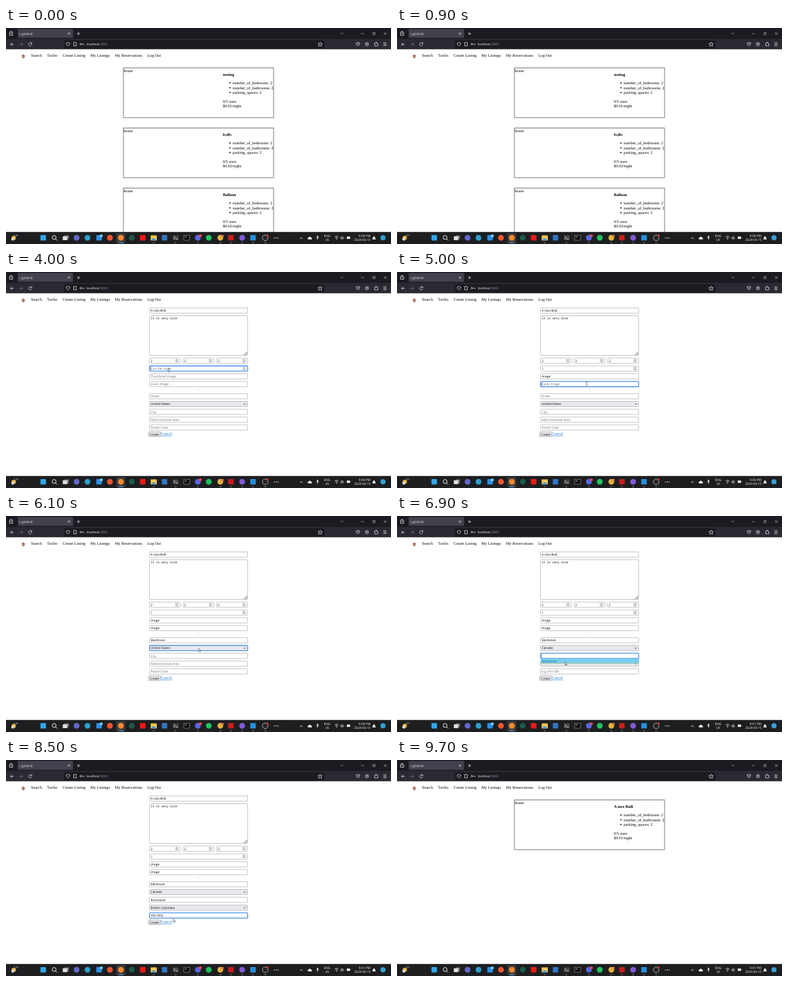
Recreate the animation shown at these times as an HTML page. Size 600 by 338 pixels, loop 9900 ms.

```html
<!DOCTYPE html>
<html lang="en">
<head>
<meta charset="utf-8">
<title>Listing form</title>
<style>
html, body { margin: 0; width: 100%; height: 100%; overflow: hidden; background: #fff; }
svg { display: block; text-rendering: geometricPrecision; }
text { white-space: pre; }
.serif { font: 6.25px "Liberation Serif", serif; }
.bold { font: bold 6.25px "Liberation Serif", serif; }
.ui { font: 500 4.85px "Open Sans", sans-serif; }
.mono { font: 4.6px "DejaVu Sans Mono", monospace; }
</style>
</head>
<body>
<svg width="600" height="338" viewBox="0 0 600 338">
  <rect width="600" height="338" fill="#fff"/>
  <g id="chrome"></g>
  <g id="page"></g>
  <g id="bar"></g>
  <g id="pointer"></g>
</svg>
<script>
const LOOP = 9900, STEP = 100;
const $ = id => document.getElementById(id);
const rect = (x, y, w, h, fill, extra = '') =>
  `<rect x="${x}" y="${y}" width="${w}" height="${h}" fill="${fill}" ${extra}/>`;
const dot = (x, y, r, fill, extra = '') => `<circle cx="${x}" cy="${y}" r="${r}" fill="${fill}" ${extra}/>`;
const line = (d, stroke = '#ddd', w = .8, fill = 'none') =>
  `<path d="${d}" fill="${fill}" stroke="${stroke}" stroke-width="${w}"/>`;
const text = (s, x, y, cls = 'serif', fill = '#000', extra = '') =>
  `<text x="${x}" y="${y}" class="${cls}" fill="${fill}" ${extra}>${s}</text>`;

function drawChrome() {
  return rect(0, 0, 600, 17, '#1c1b22') + rect(0, 17, 600, 16.3, '#2b2a33') +
    rect(18.2, 1.5, 86.3, 14, '#42414d', 'rx="1.5"') +
    text('LightBnB', 21, 10.6, 'ui', '#e4e4e8') +
    line('M96.500 7l3.500 3.500m0-3.500l-3.500 3.500M110.500 8.800h5m-2.500-2.500v5') +
    line('M5.500 7h5v4.500h-5zM6.300 5.500h3.400M6.800 9h2.400') +
    line('M521 7.500l2.200 2.200 2.200-2.200', '#aaa') +
    line('M553.500 8.800h4M571.800 7h3.400v3.400h-3.400zM589 6.800l4 4m0-4l-4 4', '#ddd', .6) +
    line('M12 25.500h-5m2.300-2.300l-2.300 2.300 2.300 2.300') +
    line('M21 25.500h5m-2.300-2.300l2.300 2.300-2.300 2.300', '#77767e') +
    line('M39.600 24a2.500 2.500 0 1 0 .4 2.200M40.200 22.300v2.200h-2.200') +
    rect(90.5, 19, 406, 13, '#1c1b22', 'rx="1.5"') +
    line('M96.500 22.500l2.500 .8v2.500l-2.500 2.200-2.500-2.200v-2.500zM105.500 22.700h4v5.300h-4z') +
    dot(116.5, 25.3, 1.2, 'none', 'stroke="#ddd" stroke-width=".8"') + line('M117.700 25.300h4v1.300') +
    text('localhost<tspan fill="#9a99a3">:3000</tspan>', 125.5, 27.3, 'ui', '#fff') +
    line('M489.500 22l1 2.300 2.500 .2-1.900 1.700 .6 2.500-2.200-1.400-2.200 1.400 .6-2.500-1.900-1.700 2.500-.2z') +
    line('M546 23h5v2.500q-2.500 4.500-5 0zM547.300 24.600l1.200 1.200 1.200-1.200') +
    dot(562.5, 25.3, 2.6, 'none', 'stroke="#ddd" stroke-width=".8"') + dot(562.5, 25, 1.1, '#ddd') +
    line('M574.500 24h1.500v-1.500h1.800v1.500h1.700v4h-5zM588 23.200h5m-5 2.200h5m-5 2.200h5') +
    // navigation
    rect(25, 43.8, 4, 3.4, '#d2a184') + line('M24.200 44l2.800-2.600 2.800 2.600z', '#96594a', .5, '#b0695a') +
    rect(26.4, 45.2, 1.2, 2, '#7a4b3a') +
    [['Search', 39], ['Tavlin', 64], ['Create Listing', 88.3], ['My Listings', 131.5],
     ['My Reservations', 169.8], ['Log Out', 220.2]].map(([s, x]) => text(s, x, 45.4)).join('');
}

// plain marks of the task bar: x, colour, round
const MARKS = [[58, '#35a5e5'], [110, '#6168c8', 1], [127, '#2b9fd0', 1], [145, '#2f8fe0'],
  [162, '#f2542d', 1], [179, '#f58a2c', 1], [196, '#1d5a4a', 1], [213, '#f01818'], [247, '#3575c0'],
  [299, '#5966e8', 1], [316, '#1fc35c', 1], [334, '#e2b23a', 1], [350.5, '#c81e1e'],
  [368, '#7f5cd6', 1], [385, '#2590dc']];

function drawBar(clock) {
  const small = (s, x, y, anchor = 'end') => text(s, x, y, 'ui', '#fff', `text-anchor="${anchor}"`);
  return rect(0, 319.2, 600, 18.8, '#1d1e20') +
    rect(172, 321, 14, 15.5, '#3a3b3d', 'rx="1.5"') +
    dot(12, 328.5, 3.3, '#f3b93c') + dot(10.5, 330.5, 2.2, '#d8dce2') + small('17°', 19.5, 327, 'end') +
    MARKS.map(([x, c, round]) => round ? dot(x, 328.3, 4.5, c) : rect(x - 4.3, 324, 8.6, 8.6, c, 'rx="1"')).join('') +
    dot(75, 327.8, 3.1, 'none', 'stroke="#eee"') + line('M77.300 330l2.500 2.600', '#eee', 1) +
    rect(91, 324.5, 7, 6, '#777') + rect(88.5, 326, 7, 6, '#ddd') +
    rect(225.5, 324.5, 9.5, 8, '#f4c84c', 'rx=".7"') + rect(227.5, 329.5, 5.5, 3, '#3e92d3') +
    rect(260, 324.5, 9, 7.5, '#474747', 'rx="1"') + line('M261.500 326.500l2 1.700-2 1.700m3 .3h3', '#fff') +
    rect(277, 324.5, 9, 7.5, '#090909', 'stroke="#aaa" stroke-width=".6"') + line('M278.500 327h3', '#fff') +
    dot(148.5, 325.3, 2.4, '#75c8f2') + dot(303, 325, 2.2, '#e44') + dot(337.5, 325.5, 2, '#e66a52') +
    dot(404, 328.3, 4.4, '#242424', 'stroke="#ccc" stroke-width=".8"') + dot(407.5, 324.8, 1.7, '#e33') +
    [418.5, 421.3, 424.1].map(x => dot(x, 328.5, .8, '#fff')).join('') +
    [179, 230, 264, 299, 334, 350.5, 368, 385, 404].map(x =>
      rect(x - (x == 179 ? 4 : 1.5), 335.5, x == 179 ? 8 : 3, 1, x == 179 ? '#65bce9' : '#8c8c8c', 'rx=".5"')).join('') +
    line('M458 330l2.300-2.300 2.300 2.300', '#fff') +
    line('M471 330.500q-1.700-2 .7-2.500 1.500-2.500 3-.3 2.500 .5 1.500 2.800z', '#eee', .6, '#eee') +
    rect(484.5, 325, 2, 4, '#eee', 'rx="1"') + line('M483.500 328q2 4 4 0M485.500 330v1.800', '#ddd', .6) +
    small('ENG', 500.5, 326.7, 'middle') + small('US', 500.5, 333.2, 'middle') +
    line('M512.500 327q2.700-2.500 5.400 0M513.700 328.800q1.500-1.500 3 0', '#fff') + dot(515.2, 330.3, .7, '#fff') +
    line('M521.500 327.500h1.200l1.600-1.500v5l-1.600-1.500h-1.200zM525.500 327q1.300 1.500 0 3', '#fff', .6) +
    rect(531, 326.3, 5, 3.8, '#ddd') + rect(536, 327.4, .8, 1.6, '#ddd') +
    small(clock, 568, 326.7) + small('2024-06-15', 568, 333.2) +
    line('M571 330.500q1-1 1-3 1.500-2.500 3 0 0 2 1 3z', '#eee', .6, '#ddd') +
    dot(587.5, 328.3, 4, '#34a3d8');
}

function card([title, price], i) {
  const y = 62 + 94 * i;
  const item = (s, k) => dot(349, y + 24 + k * 7.5, 1, '#000') + text(s, 353.3, y + 26 + k * 7.5);
  return rect(183, y + .5, 234, 77.7, '#fff', 'stroke="#555" stroke-width=".8"') +
    text('house', 183.2, y + 6.5) + text(title, 338, y + 12.5, 'bold') +
    ['number_of_bedrooms: 2', 'number_of_bathrooms: 2', 'parking_spaces: 2'].map(item).join('') +
    text('0/5 stars', 338, y + 55) + text(`$${price}/night`, 338, y + 62);
}

const MINE = ['A nice BnB', '0.01'];
const OLD = [['testing', '0.01'], ['fvdfv', '0.02'], ['Balloon', '0.02']];

// moments at which each field takes the focus
const FOCUS = [[1700, 'title'], [2300, 'about'], [3200, 'bed'], [3500, 'bath'], [3700, 'park'],
  [4000, 'cost'], [4500, 'thumb'], [5000, 'cover'], [5300, 'street'], [6000, 'country'],
  [6700, 'city'], [7100, 'area'], [7300, ''], [7600, 'post'], [8900, '']];

function form(t) {
  const focus = (FOCUS.filter(f => f[0] <= t).pop() || [0, ''])[1];
  const canada = t >= 6300;
  const typed = (s, start, step = 50) => s.slice(0, Math.max(0, Math.floor((t - start) / step) + 1));

  const frame = (name, x, y, w, h, fill) => rect(x, y, w, h, fill, focus == name
    ? 'stroke="#458fe8" stroke-width="1.300" rx="1"' : 'stroke="#9a9aa2" stroke-width=".6" rx="1"');

  function input(name, y, hint, value, x = 223.6, w = 153, h = 8.2, cls = 'ui') {
    const on = focus == name;
    const caret = on ? '<tspan class="ui">|</tspan>' : '';
    return frame(name, x, y, w, h, '#fff') +
      (value ? text(value + caret, x + 1.8, y + 5.9, cls) : text(hint, x + 1.8, y + 5.9, cls, '#68686d')) +
      (on && !value ? rect(x + 1.4, y + 1.5, .5, 5.4, '#000') : '');
  }
  const spinner = (x, y) => rect(x, y + 1.2, 6, 5.8, '#dedee2', 'rx="1"') +
    line(`M${x + 1.800} ${y + 3.500}l1.200-1.200 1.200 1.200m-2.400 1.400l1.200 1.200 1.200-1.200`, '#777', .6);
  const number = (name, x, y, w, hint, value) => input(name, y, hint, value, x, w) + spinner(x + w - 8.5, y);
  const select = (name, y, value, fill = '#e9e9ed') => frame(name, 223.6, y, 153, 8.2, fill) +
    text(value, 225.6, y + 5.9, 'ui') + line(`M370.500 ${y + 3.500}l1.500 1.500 1.500-1.500`, '#222');

  const popup = t >= 6700 && t < 7000
    ? rect(224, 223, 153, 8, '#7bcdf2') + text('Richmond', 225.6, 228.9, 'ui', '#1d5b86') +
      `<path d="M224 230.800h153" stroke="#c9c04a" stroke-width=".8" stroke-dasharray="3 1"/>` : '';
  const hints = (t < 3300 ? rect(232, 138, 5, 2.2, '#8a8a8e') : '') +
    (t < 3600 ? line('M285 140.500h2v-4h1', '#999') : '') +
    (t < 3800 ? line('M336 140.500l2-3.500 2.500 3.500z', '#888', .5, '#aaa') : '');

  return input('title', 56.2, '', typed('A nice BnB', 1750)) +
    input('about', 68.5, '', typed('it is very nice', 2350), 223.6, 153, 62, 'mono') +
    line('M370.500 129.500l5-5v5z', '#aaa', .5, '#c4c4c8') +
    number('bed', 223.6, 134.8, 48.2, '#', typed('2', 3300)) +
    number('bath', 276, 134.8, 48.2, '#', typed('2', 3600)) +
    number('park', 328.2, 134.8, 48.4, '#', typed('2', 3800)) + hints +
    number('cost', 223.6, 147, 153, 'Cost Per Night', typed('1', 4400)) +
    input('thumb', 159.2, 'Thumbnail Image', typed('image', 4600)) +
    input('cover', 171.3, 'Cover Image', typed('image', 5050)) +
    rect(299.2, 184.5, 1.5, .6, '#888') +
    input('street', 190.4, 'Street', typed('Marbrook', 5400)) +
    select('country', 202.5, canada ? 'Canada' : 'United States') +
    input('city', 214.7, canada ? '' : 'City', t >= 7000 ? 'Richmond' : '') +
    (canada ? select('area', 226.9, t < 7300 ? '' : 'British Columbia', t >= 7300 && t < 7600 ? '#d0d0d7' : '#e9e9ed')
            : input('area', 226.9, 'Administrative Area', '')) +
    input('post', 239.1, canada ? 'e.g. K1A 0B1' : 'Postal Code', typed('V0X 0X0', 7700, 80)) +
    rect(222.2, 250, 18.8, 7.6, t >= 8700 ? '#d0d0d7' : '#e9e9ed', 'rx="1" stroke="#909097" stroke-width=".6"') +
    text('Create', 224, 255.6, 'ui') +
    text('Cancel', 241.3, 255.3, 'serif', '#1c7ed2', 'text-decoration="underline"') + popup +
    (focus == 'about' ? dot(396.3, 128.8, 8, '#e3e7e7') + dot(396.3, 128.5, 7, '#128a70') : '');
}

// pointer path: time, x, y, shape (I = text beam, A = arrow, empty = hidden)
const PATH = [[0, 0, 0, ''], [1000, 370, 300, 'A'], [1200, 105, 43, 'A'], [1500, 105, 43, 'A'],
  [1700, 290, 61, 'I'], [1800, 290, 61, ''], [2200, 290, 61, 'I'], [2300, 290, 100, 'I'], [2350, 290, 100, ''],
  [3000, 290, 100, 'I'], [3200, 245, 139, 'I'], [3400, 245, 139, 'I'], [3500, 297, 139, 'I'], [3700, 349, 139, 'I'],
  [3800, 349, 139, 'I'], [4000, 254, 153.5, 'I'], [4300, 254, 153.5, 'I'], [4500, 280, 163, 'I'], [4600, 0, 0, ''],
  [4900, 280, 163, 'I'], [5000, 295.7, 174.5, 'I'], [5100, 0, 0, ''], [5200, 295.7, 174.5, 'I'],
  [5300, 270, 194, 'I'], [5400, 0, 0, ''], [5800, 270, 194, 'I'], [6000, 300, 207, 'A'], [6300, 300, 207, 'A'],
  [6600, 262, 219, 'I'], [6800, 262, 219, 'I'], [6900, 261.7, 228.3, 'A'], [7050, 261.7, 228.3, 'A'],
  [7200, 300, 230, 'A'], [7400, 305.7, 234, 'A'], [7600, 290, 243, 'I'], [7700, 0, 0, ''],
  [8300, 290, 243, 'A'], [8700, 231, 254, 'A'], [8900, 231, 254, 'A'], [9300, 147, 43, 'A'],
  [9600, 147, 43, 'A'], [9700, 0, 0, ''], [LOOP, 0, 0, '']];

function pointer(t) {
  const i = PATH.findIndex((p, k) => t >= p[0] && t < PATH[k + 1][0]);
  const [t0, x0, y0, shape] = PATH[i], [t1, x1, y1] = PATH[i + 1];
  if (!shape) return '';
  const u = (t - t0) / (t1 - t0), e = PATH[i + 1][3] ? u * u * (3 - 2 * u) : 0;
  const at = `M${x0 + (x1 - x0) * e} ${y0 + (y1 - y0) * e}`;
  return shape == 'I' ? line(at + 'm-1.200-2.700h2.400m-1.200 0v5.400m-1.200 0h2.400', '#333', .6)
    : line(at + 'v5l1.200-1.100 .8 1.800 .8-.4-.8-1.700h1.600z', '#222', .5, '#fff');
}

function view(t) {
  if (t >= 1400 && t < 8900) return form(t);
  const cards = t < 1400 ? OLD : t < 9400 ? [OLD[0], MINE, OLD[1]] : [MINE];
  return cards.map(card).join('');
}

$('chrome').innerHTML = drawChrome();
let shown = -1;
function tick() {
  const t = Math.floor(performance.now() % LOOP / STEP) * STEP;
  if (t != shown) {
    shown = t;
    $('page').innerHTML = view(t);
    $('bar').innerHTML = drawBar(t < 6400 ? '9:00 PM' : '9:01 PM');
    $('pointer').innerHTML = pointer(t);
  }
  requestAnimationFrame(tick);
}
tick();
</script>
</body>
</html>
```
